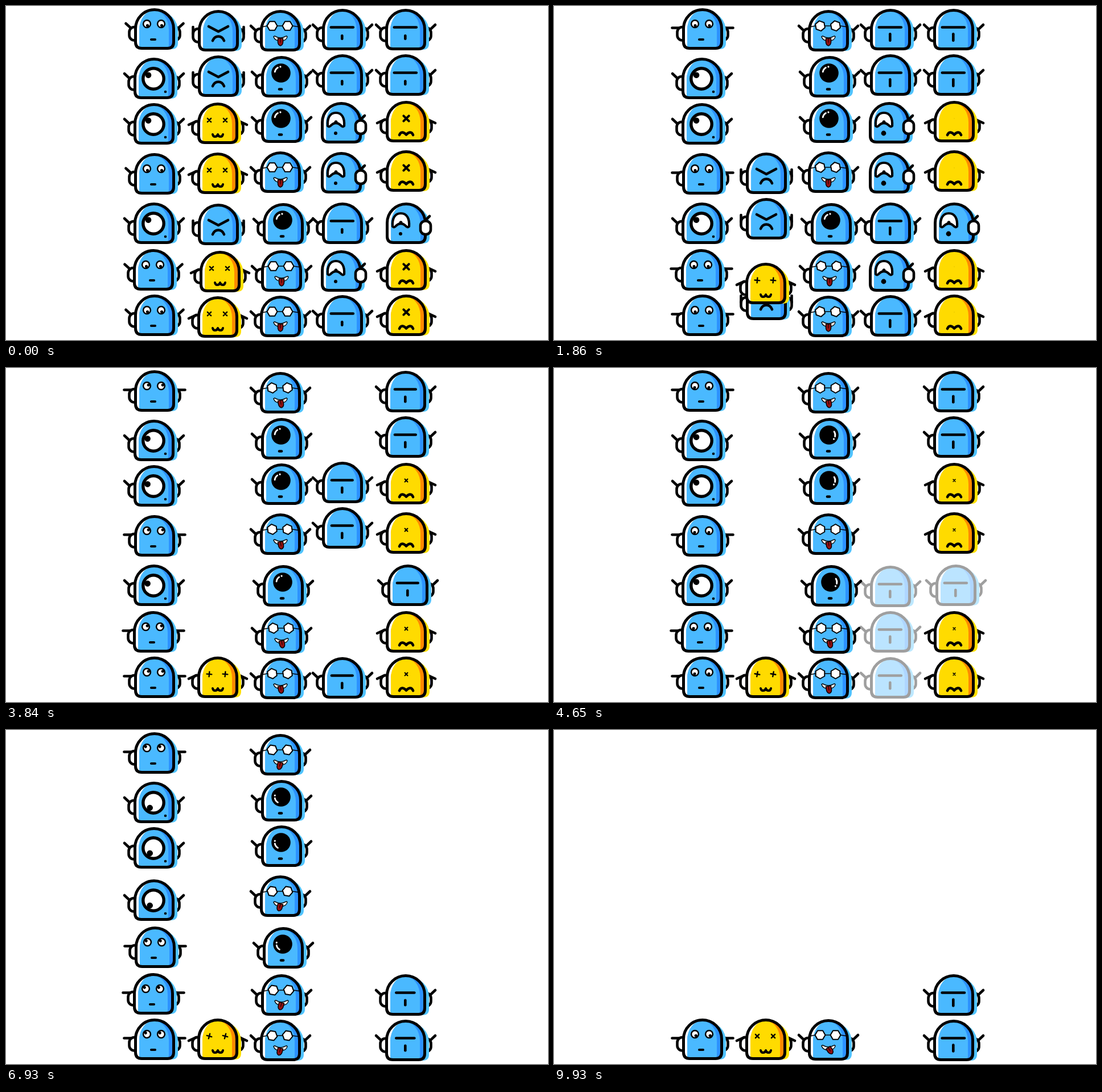
An HTML page that plays this animation: 952 by 588 pixels, repeating every 9960 ms.

```html
<!DOCTYPE html>
<html lang="en">
<head>
<meta charset="utf-8">
<title>Robot match</title>
<style>
  html, body { margin: 0; width: 100%; height: 100%; overflow: hidden; background: #fff; }
  svg { display: block; width: 952px; height: 588px; }
  .ink { fill: none; stroke: #000; stroke-width: 4.6; stroke-linecap: round; stroke-linejoin: round; }
  .white { fill: #fff; }
  .fixed { vector-effect: non-scaling-stroke; }
</style>
</head>
<body>
<svg id="stage" viewBox="0 0 952 588"><defs><clipPath id="inside"></clipPath></defs></svg>
<script>
const LOOP = 9960, SLIDE = 400, FADE = 400;
const stage = document.getElementById('stage');

// ---------- drawing ----------
const shell = (l, t, r, b) => {
  const rx = (r - l) / 2;
  return `M${l} ${b - 11}V${t + 33.5}A${rx} 33.5 0 0 1 ${r} ${t + 33.5}V${b - 11}q0 11-11 11H${l + 11}q-11 0-11-11Z`;
};
const outline = shell(-33.5, 2.5, 33.5, 70.5);
document.getElementById('inside').innerHTML = `<path d="${outline}"/>`;

const ink = (d, extra = '') => `<path class="ink" d="${d}" ${extra}/>`;
const dot = (x, y, r, extra = '') => `<circle cx="${x}" cy="${y}" r="${r}" ${extra}/>`;
const at = (x, y, inner) => `<g transform="translate(${x} ${y})">${inner}</g>`;
const posed = (name, inner) => `<g data-pose="${name}">${inner}</g>`;
const mirror = inner => inner + `<g transform="scale(-1 1)">${inner}</g>`;

const blue = ['#4ab9ff', '#2c92ff', '#50c3ff'];
const yellow = ['#ffdb00', '#ff8a00', '#ffe000'];

function body([main, shade, glow]) {
  return `<path d="${shell(-25, 6, 41, 72)}" fill="${glow}"/>
    <path d="${outline}" fill="#fff"/>
    <g clip-path="url(#inside)">
      <path d="${shell(-27, 4, 42, 76)}" fill="${shade}"/>
      <path d="${shell(-27, 4, 25, 76)}" fill="${main}"/>
    </g>` + ink(outline, 'style="stroke-width:5"');
}

const ear = '<rect class="ink white" x="-44.5" y="33" width="24" height="23.5" rx="9"/>';
const arms = {
  up: ink('M-52 28L-43 36.5'),
  down: ink('M-51 39L-38 33'),
  upright: ink('M-44.5 30V42'),
  swing: `<g transform="translate(-42 34.5)">${posed('arm', ink('M-11.5 0H0'))}</g>`
};

const roundEye = x => at(x, 27.5,
  dot(0, 0, 6.4, 'class="ink white" style="stroke-width:2.5"') + posed('pupil', dot(0, -3.2, 2.6)));
const cross = (x, size, width, pose) => at(x, 31,
  posed(pose, ink(`M${-size} 0H${size}M0 ${-size}V${size}`, `style="stroke-width:${width}"`)));
const hexagon = Array.from({ length: 6 }, (_, i) =>
  `${9 * Math.cos(i * Math.PI / 3)},${9 * Math.sin(i * Math.PI / 3)}`).join(' ');
const lens = x => at(x, 28,
  posed('lens', `<polygon class="ink white" style="stroke-width:2" points="${hexagon}"/>`));

const robots = {
  A: { arm: 'swing', face: roundEye(-13.5) + roundEye(11.5) + ink('M-6 55H1', 'style="stroke-width:4"') },
  B: { arm: 'up', face: at(-1, 37, dot(0, 0, 18.2, 'class="ink white" style="stroke-width:5.4"') +
      posed('gaze', dot(0, -11, 5.3))) + dot(20, 60, 2.3) },
  D: { arm: 'upright', face: ink('M-17 29L0 38L17 29') + ink('M-10 54C-6 44 6 44 10 54') },
  Y: { arm: 'down', skin: yellow, face: cross(-15, 4.4, 2.4, 'spin') + cross(13, 4.4, 2.4, 'spin') +
      ink('M-9 56Q-8 60-5 60Q-1 60 0 56Q1 60 5 60Q8 60 9 56', 'style="stroke-width:4"') },
  G: { arm: 'up', face: ink('M-33 30L-23 28M-6 28H4M21 28L34 30', 'style="stroke-width:1.4"') + lens(-14.5) + lens(12.5) +
      '<path class="ink white" style="stroke-width:1.4" d="M-12 47Q-10 45-8 47Q0 51 8 47Q11 45 12 47Q11 54 0 55Q-10 54-12 47Z"/>' +
      at(0, 51, posed('tongue', '<path class="ink" style="stroke-width:1.5;fill:#930f0f" d="M-4.5-1H4.5V6Q4 11 0 12Q-4 11-4.5 6Z"/>' +
      ink('M0 0V6', 'style="stroke-width:1"'))) },
  E: { arm: 'up', face: at(-1, 30, dot(0, 0, 16.8) + posed('shine',
      ink('M-4.5-10Q0-12 4.5-10', 'style="stroke:#fff;stroke-width:2.8"') + dot(8.4, -7.2, 1.6, 'fill="#fff"'))) +
      ink('M-4 58.5H0') },
  S: { arm: 'up', face: at(-0.7, 32.5, posed('brow', ink('M-1 0H1', 'class="ink fixed"').replace('class="ink"', ''))) +
      at(-0.7, 50, posed('nose', ink('M0-1V1', 'class="ink fixed"').replace('class="ink"', ''))) },
  X: { arm: 'down', skin: yellow, face: cross(0, 6.6, 4, 'blink') +
      ink('M-12 60Q-10 55-6.5 55.5Q-3 56 0 59.5Q3 56 6.5 55.5Q10 55 12 60') },
  C: { face: ink('M-24 42C-25 28-20 19-9.5 19C1 19 6 28 5 42Q2 45-1 41Q-9.5 33-18 41Q-21 45-24 42Z', 'fill="#fff" style="fill:#fff;stroke-width:4.2"') +
      dot(-9.5, 35, 2.8) + at(-10, 55, posed('mouth', dot(0, 0, 1))),
      front: ink('M35 30L41 24') + '<rect class="ink white" x="25" y="32.5" width="18" height="23.5" rx="8.5"/>' }
};

function draw(type) {
  const { arm, face, front = '', skin = blue } = robots[type];
  return (arm ? mirror(ear + arms[arm]) : '') + body(skin) + face + front;
}

// ---------- board: kinds, centre x and top y per column ----------
const columns = [
  ['ABBABAA', [261, 260, 260, 261, 260, 259, 261], [4, 91, 171, 259, 346, 428, 508]],
  ['DDYYDYY', [373, 373, 372, 372, 373, 376, 372], [7, 87, 170, 258, 348, 431, 511]],
  ['GEEGEGG', [482, 484, 484, 482, 487, 484, 482], [7, 88, 168, 256, 347, 430, 510]],
  ['SSCCSCS', [591, 591, 589, 589, 591, 589, 591], [5, 85, 169, 257, 346, 430, 509]],
  ['SSXXCXX', [702, 702, 703, 703, 703, 703, 703], [5, 85, 167, 254, 346, 428, 508]]
];
const pieces = columns.flatMap(([kinds, xs, ys]) =>
  [...kinds].map((kind, i) => ({ kind, x: xs[i], y: ys[i], moves: [], gone: Infinity })));

const move = (start, ids, dx, dy) => ids.forEach(i => pieces[i].moves.push({ start, dx, dy }));
const remove = (start, ids) => ids.forEach(i => pieces[i].gone = start);

move(150, [10], 0, 88);
move(150, [11], 0, -88);
remove(630, [10, 12, 13]);
move(1050, [7, 8, 9, 11], 0, 251);
move(1700, [9], 0, 87);
move(1700, [11], 0, -87);
remove(2180, [7, 8, 11]);
move(2770, [25], 115, 0);
move(2770, [32], -114, 0);
remove(3250, [23, 24, 26, 32]);
move(3650, [21, 22], 0, 343);
remove(4400, [21, 22, 25, 27]);
move(4800, [28, 29, 30, 31], 0, 85);
remove(5540, [30, 31, 33, 34]);
move(5940, [28, 29], 0, 340);
move(6480, [3], 1, 87);
move(6480, [4], 0, -83);
remove(6960, [1, 2, 3, 4, 5, 6]);
move(7360, [0], 0, 504);
move(8310, [17], 2, 89);
move(8310, [18], -3, -91);
remove(8790, [15, 16, 17, 18, 19, 20]);
move(9200, [14], 0, 502);

// earlier pieces lie on top
for (const piece of [...pieces].reverse()) {
  piece.node = document.createElementNS('http://www.w3.org/2000/svg', 'g');
  piece.node.innerHTML = draw(piece.kind);
  stage.append(piece.node);
}

// ---------- motion ----------
const clamp = v => Math.max(0, Math.min(1, v));
const ease = v => { v = clamp(v); return v * v * (3 - 2 * v); };

const beats = [0, 1860, 2910, 4650, 6930, 8550, 9960];
function along(t, values) {
  let i = 0;
  while (i < beats.length - 2 && t >= beats[i + 1]) i++;
  return values[i] + (values[i + 1] - values[i]) * (t - beats[i]) / (beats[i + 1] - beats[i]);
}

const turn = values => t => `rotate(${along(t, values)})`;
const poses = {
  arm: t => `rotate(${42 * (1 - ease(t / 1900))})`,
  pupil: turn([160, 530, 630, 910, 1035, 1080, 1230]),
  gaze: turn([305, 305, 270, 305, 215, 215, 215]),
  shine: turn([305, 665, 860, 1160, 1675, 1800, 2000]),
  spin: turn([45, 5, 0, 10, 15, 45, 45]),
  lens: turn([0, 20, 15, 30, 10, 30, 0]),
  tongue: turn([0, 0, -12, -10, 15, 8, -35]),
  brow: t => `scale(${along(t, [19.5, 19.5, 17, 19.5, 16, 15, 19.8])} 1)`,
  nose: t => `scale(1 ${along(t, [2.8, 5.8, 2.9, 5.2, 4.3, 2.3, 5.6])})`,
  blink: t => `rotate(45) scale(${along(t, [1, 0.03, 0.65, 0.4, 0, 0, 0])})`,
  mouth: t => `scale(${along(t, [3, 4.4, 4.2, 3, 3, 3, 3])})`
};
const parts = [...stage.querySelectorAll('[data-pose]')];

function frame(now) {
  const t = now % LOOP;
  for (const { node, x, y, moves, gone } of pieces) {
    let px = x, py = y;
    for (const { start, dx, dy } of moves) {
      const k = ease((t - start) / SLIDE);
      px += dx * k;
      py += dy * k;
    }
    node.setAttribute('transform', `translate(${px} ${py})`);
    node.setAttribute('opacity', 1 - clamp((t - gone) / FADE));
  }
  for (const part of parts) part.setAttribute('transform', poses[part.dataset.pose](t));
  requestAnimationFrame(frame);
}
requestAnimationFrame(frame);
</script>
</body>
</html>
```
